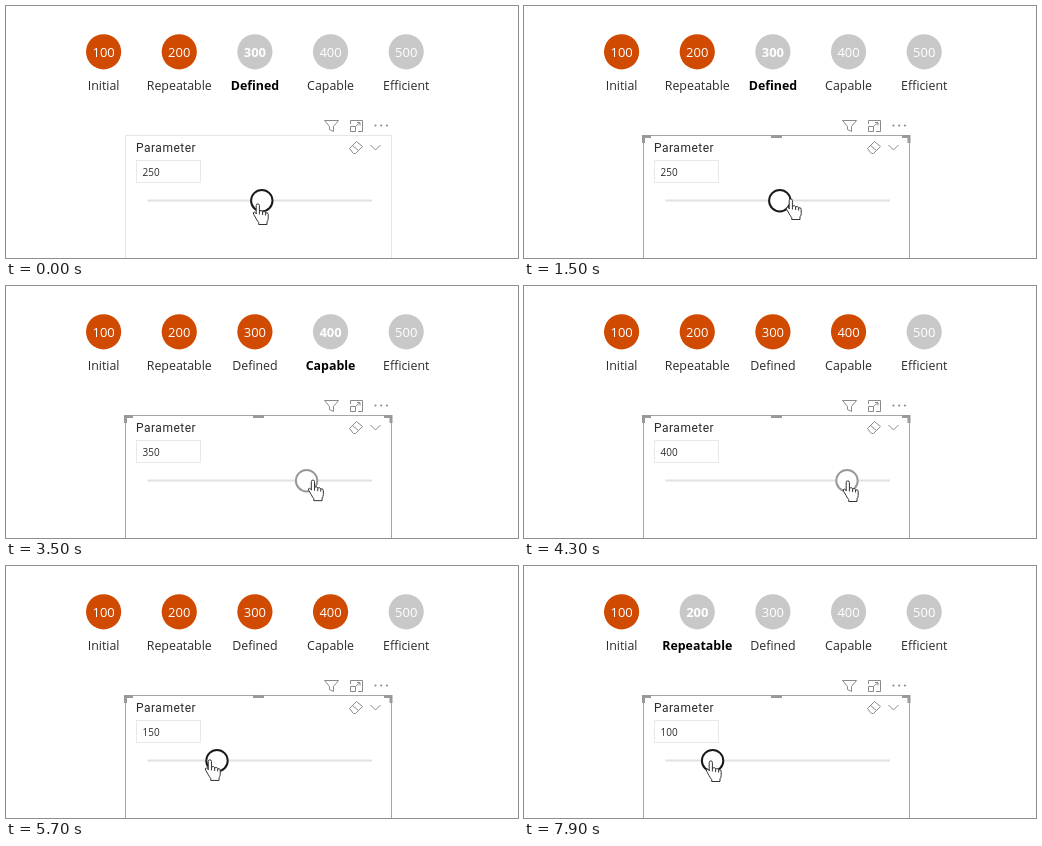
Write an HTML page that moves like this. It is 512 px wide and 252 px high and loops after 8 s.

```html
<!DOCTYPE html>
<html lang="en">
<meta charset="utf-8">
<title>Maturity slider</title>
<style>
  html, body { margin: 0; height: 100%; overflow: hidden; background: #fff; }
  svg { display: block; width: 512px; height: 252px; }
  text { font-family: "Open Sans", sans-serif; fill: #2b2b2b; }
  #steps text { text-anchor: middle; font-size: 12.4px; }
  #steps .num { font-size: 13px; fill: #fff; }
  #steps circle { fill: #c8c8c8; }
  #steps .done circle { fill: #d04a02; }
  .next text { font-weight: 700; }
  .next text:not(.num) { fill: #000; }
  .icon { fill: none; stroke: #8a8a8a; }
  .cursor { fill: #fff; stroke: #333; stroke-linejoin: round; }
</style>
<svg viewBox="0 0 512 252">
  <g id="steps"></g>
  <g class="icon">
    <path d="M318.5 114.5H332.5L327.5 120.5V125.5L323.5 123.5V120.5Z"/>
    <path d="M344.5 118V114.500H356.500V125.500H352M344.500 120.500H349.500V125.500H344.500ZM350 120L354 116.500M351 116.500H354V119.500"/>
    <path d="M343.5 142.5L350.5 135.5L356.500 140.500L349.500 147.500H347.500ZM346.500 139.500L352.500 144.500"/>
    <path d="M364.500 139L369.500 144L374.500 139"/>
    <path d="M369.500 119.500h12" stroke-width="2.200" stroke-linecap="round" stroke-dasharray="0 5.700"/>
  </g>
  <rect id="panel" x="119.500" y="129.500" width="266" height="140" fill="none"/>
  <path id="grips" d="M119.500 137V130.500H127M378 130.500H385V137M247 130.500H258" fill="none" stroke="#999" stroke-width="3"/>
  <text x="130" y="145.500" style="font: 12px Roboto, sans-serif; letter-spacing: .5px">Parameter</text>
  <rect x="130.500" y="154.500" width="64" height="22" fill="#fff" stroke="#e8e8e8"/>
  <text id="value" x="136.500" y="170" font-size="10"></text>
  <path d="M141.500 194.500H366" stroke="#e1e1e1" stroke-width="2.200"/>
  <circle id="knob" cy="194.700" r="10.700" fill="#fff" stroke-width="2"/>
  <g id="hand" class="cursor">
    <path d="M-1.8 10V1.500a1.600 1.600 0 0 1 3.200 0V7q3-1 3.200.8q2.800-.8 3 .9q2.600-.4 2.600 1.700v4q0 2-1.200 3.400v2.700h-8.300v-2q-1.200-1.200-2.600-4l-2.400-4q-1.200-2.400.6-2.400q1 0 1.900 1.500z"/>
    <path d="M1.400 7v3.500M4.600 8v3M7.600 9v2.500" fill="none"/>
  </g>
  <path id="arrow" class="cursor" d="M0 0V14l3.300-3.100 2.400 5.600 2.300-1-2.400-5.400h4.600z"/>
</svg>
<script>
const $ = id => document.getElementById(id);
const LOOP = 8000, TICK = 100, MOVE = 400;      // ms
const RELEASE = 300, REFRESH = 500, SETTLE = 900; // ms after a new value is set
const ZERO_X = 143.8, SCALE = 0.448, SNAP = 50, KNOB_Y = 194.7;

// Where the pointer arrives, and whether the knob comes along
const stops = [
  { at: -1000, x: 252, y: 198, drag: true },
  { at: 1400, x: 267, y: 193 },
  { at: 2000, x: 286, y: 193, drag: true },
  { at: 2900, x: 304, y: 194, drag: true },
  { at: 3800, x: 324, y: 195, drag: true },
  { at: 4900, x: 179, y: 196 },
  { at: 5500, x: 210, y: 195, drag: true },
  { at: 6000, x: 172, y: 188 },
  { at: 7200, x: 210, y: 195 },
  { at: 7700, x: 187, y: 195, drag: true }
];
const drags = stops.filter(s => s.drag);
const lastBefore = (list, t) => list.findLast(s => s.at <= t);
const snapped = ({ x }) => Math.round((x - ZERO_X) / SCALE / SNAP) * SNAP;

function pointerAt(t) {
  const from = lastBefore(stops, t), to = stops.find(s => s.at > t) ?? from;
  const p = Math.min(1, Math.max(0, 1 - (to.at - t) / MOVE));
  const ease = p * p * (3 - 2 * p);
  return [from.x + (to.x - from.x) * ease, from.y + (to.y - from.y) * ease];
}

$("steps").innerHTML = ["Initial", "Repeatable", "Defined", "Capable", "Efficient"].map((name, i) =>
  `<g transform="translate(${97.6 + 75.65 * i})"><circle cy="45.800" r="17.600"/>
   <text class="num" y="50.500">${100 * (i + 1)}</text><text y="83.500">${name}</text></g>`).join("");
const steps = [...$("steps").children];

function draw(now) {
  const t = Math.floor(now % LOOP / TICK) * TICK;
  const drag = lastBefore(drags, t), value = snapped(drag);
  const level = snapped(lastBefore(drags, t - REFRESH));
  steps.forEach((step, i) => {
    const goal = 100 * (i + 1);
    step.setAttribute("class", level >= goal ? "done" : level > goal - 100 ? "next" : "");
  });

  const selected = t >= 1000;
  $("panel").setAttribute("stroke", selected ? "#a6a6a6" : "#e6e6e6");
  $("grips").style.display = selected ? "" : "none";

  const [x, y] = pointerAt(t), knobX = ZERO_X + SCALE * value;
  const over = Math.hypot(x - knobX, y - KNOB_Y) < 13;
  const age = t - drag.at, settling = age >= RELEASE && age < SETTLE;
  $("value").textContent = value;
  $("knob").setAttribute("cx", knobX);
  $("knob").setAttribute("stroke", !over ? "#666" : settling ? "#999" : "#1a1a1a");

  for (const id of ["hand", "arrow"]) {
    $(id).setAttribute("transform", `translate(${x} ${y})`);
    $(id).style.display = over === (id === "hand") ? "" : "none";
  }
}

const start = performance.now();
function frame() {
  draw(performance.now() - start);
  requestAnimationFrame(frame);
}
frame();
</script>
</html>
```
